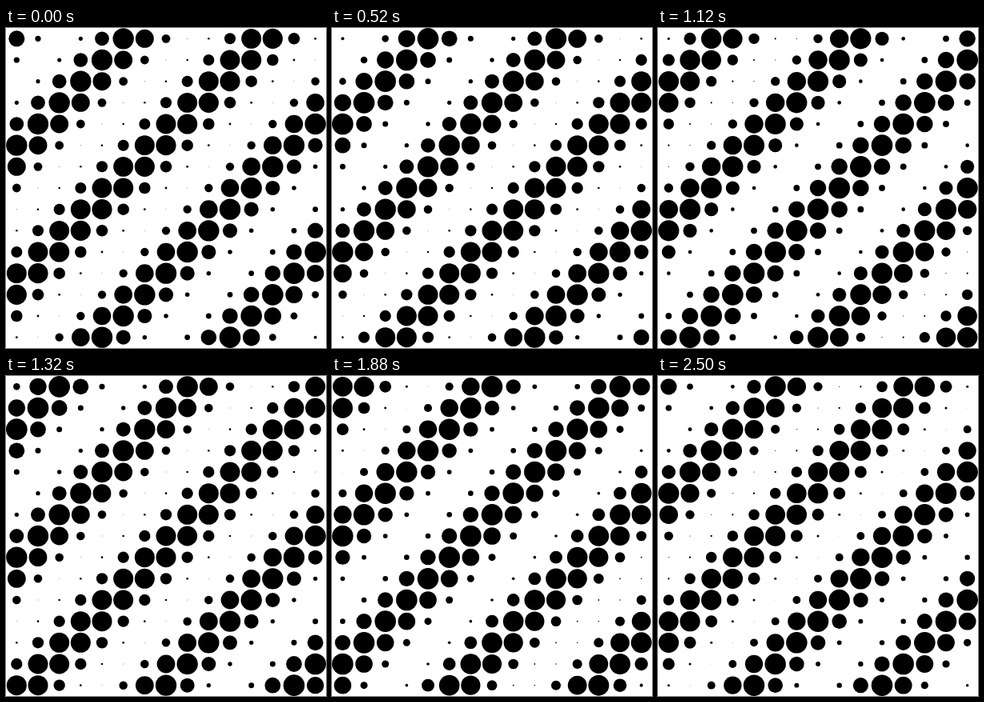
An HTML page with a canvas for the animation above (2520 ms loop, 400 by 400 pixels).

```html
<!DOCTYPE html>
<html lang="en">
<head>
<meta charset="utf-8">
<title>Dot wave</title>
<style>
  html, body { margin: 0; height: 100%; overflow: hidden; background: #fff; }
  canvas { display: block; }
</style>
</head>
<body>
<canvas id="stage" width="400" height="400"></canvas>
<script>
const ctx = document.getElementById('stage').getContext('2d');
const COUNT = 15;
const CELL = 400 / COUNT;
const STEP_MS = 20;
const STEPS = 126;
const STEP_ANGLE = 0.05;
const START_ANGLE = -5.235;

function draw(now) {
  const step = Math.floor(now / STEP_MS) % STEPS;
  const angle = START_ANGLE + step * STEP_ANGLE;
  ctx.clearRect(0, 0, 400, 400);
  ctx.fillStyle = '#000';
  for (let row = 0; row < COUNT; row++) {
    for (let col = 0; col < COUNT; col++) {
      const radius = CELL / 4 * (1 + Math.cos(row + col + angle));
      ctx.beginPath();
      ctx.arc((col + 0.5) * CELL, (row + 0.5) * CELL, radius, 0, Math.PI * 2);
      ctx.fill();
    }
  }
}

const start = performance.now();
function tick() {
  draw(performance.now() - start);
  requestAnimationFrame(tick);
}
tick();
</script>
</body>
</html>
```
